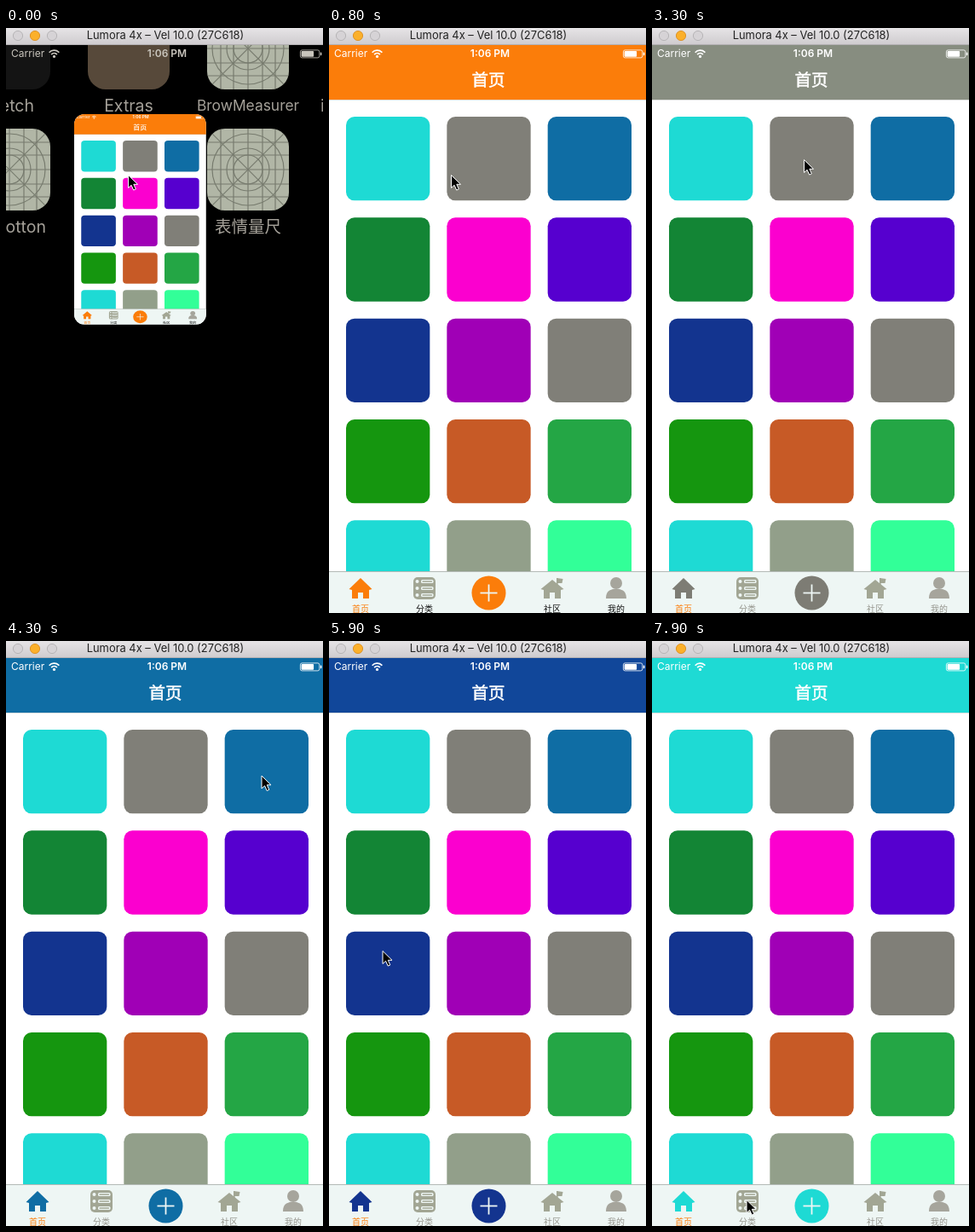
Write an HTML page with a canvas that moves like this. It is 372 px wide and 686 px high and loops after 8000 ms.

```html
<!DOCTYPE html>
<html lang="zh">
<head>
<meta charset="utf-8">
<title>Theme picker</title>
<style>
html, body { margin: 0; width: 100%; height: 100%; overflow: hidden; background: #000; }
canvas { display: block; width: 372px; height: 686px; }
</style>
</head>
<body>
<canvas id="stage"></canvas>
<script>
const W = 372, H = 686, LOOP = 8000, STEP = 100;
const canvas = document.getElementById('stage');
const dpr = window.devicePixelRatio || 1;
canvas.width = W * dpr;
canvas.height = H * dpr;
const c = canvas.getContext('2d');

const LATIN = 'Inter, "Liberation Sans", sans-serif';
const HAN = '"Noto Sans CJK SC", "Noto Sans CJK", sans-serif';
const ORANGE = '#fb7d0a';
const TABS = ['首页', '分类', '', '社区', '我的'];

const CELLS = [
  '#1edad4', '#807f78', '#0f6da4',
  '#138535', '#fb00cf', '#5600cf',
  '#13348f', '#a000b6', '#807f78',
  '#15960f', '#c75a26', '#24a645',
  '#1edad4', '#929f8a', '#32ff98'
];

// start time, header colour, accent colour
const THEMES = [
  [0, ORANGE, ORANGE],
  [1400, '#46d9e1', '#1edad4'],
  [3000, '#878d80', '#7d7c74'],
  [4100, '#0f6da4', '#0f6da4'],
  [4900, '#14913a', '#138535'],
  [5700, '#11479a', '#13348f'],
  [6500, '#15960f', '#15960f'],
  [7300, '#1edad4', '#1edad4']
];

// time, x, y of the pointer tip
const POINTER = [
  [0, 143.5, 172.5], [900, 143.5, 172.5], [1300, 80, 162.5], [2100, 80, 162.5],
  [2800, 178.5, 154.5], [3500, 178.5, 154.5], [4000, 300, 158], [4300, 300, 158],
  [4800, 52.5, 284.5], [5200, 52.5, 284.5], [5600, 63, 363.5], [6000, 63, 363.5],
  [6400, 66, 500], [6700, 66, 500], [7200, 70, 606], [7400, 70, 606],
  [7800, 111, 655.5], [8000, 111, 655.5]
];

function box(x, y, w, h, r, fill) {
  c.beginPath();
  c.roundRect(x, y, w, h, r);
  c.fillStyle = fill;
  c.fill();
}

function disc(x, y, r, fill) {
  c.beginPath();
  c.arc(x, y, r, 0, 7);
  c.fillStyle = fill;
  c.fill();
}

function poly(points, fill) {
  c.beginPath();
  points.forEach(([x, y]) => c.lineTo(x, y));
  c.closePath();
  c.fillStyle = fill;
  c.fill();
}

function text(s, x, y, font, fill, align = 'center') {
  c.font = font;
  c.fillStyle = fill;
  c.textAlign = align;
  c.textBaseline = 'middle';
  c.fillText(s, x, y);
}

function line(x1, y1, x2, y2) {
  c.beginPath();
  c.moveTo(x1, y1);
  c.lineTo(x2, y2);
  c.stroke();
}

function at(x, y, draw) {
  c.save();
  c.translate(x, y);
  draw();
  c.restore();
}

function statusBar(col) {
  text('Carrier', 6, 10.5, '400 12px ' + LATIN, col, 'left');
  c.strokeStyle = col;
  c.lineWidth = 1.7;
  for (const r of [4.6, 8]) {
    c.beginPath();
    c.arc(56.5, 14.2, r, -Math.PI * 0.76, -Math.PI * 0.24);
    c.stroke();
  }
  disc(56.5, 13.4, 1.6, col);
  text('1:06 PM', 189, 10.5, '600 12px ' + LATIN, col);
  c.lineWidth = 0.8;
  c.beginPath();
  c.roundRect(345.4, 5.9, 22.4, 9, 2);
  c.stroke();
  box(346.6, 7.1, 14.5, 6.6, 1, col);
  box(368.8, 8.6, 1.6, 3.6, 1, col);
}

function house(col, top) {
  poly([[-13.5, 1], [0, top], [13.5, 1], [10, 2], [10, 12], [3, 12], [3, 5],
    [-3, 5], [-3, 12], [-10, 12], [-10, 2]], col);
}

function homeIcon(col) {
  house(col, -12);
}

function listIcon(col) {
  box(-13, -13, 26, 26, 5, col);
  for (const y of [-8, 0, 8]) {
    disc(-8.5, y, 2, '#eef6f4');
    box(-4, y - 2, 14.5, 4, 1.5, '#eef6f4');
    box(-2.5, y - 0.8, 11.5, 1.6, 0.5, col);
  }
}

function townIcon(col) {
  house(col, -10);
  box(5, -12, 1.6, 10, 0, col);
  poly([[5, -12], [12.5, -11], [11.5, -6], [5, -6]], col);
}

function userIcon(col) {
  disc(0, -6, 7, col);
  c.beginPath();
  c.moveTo(-12, 12);
  c.bezierCurveTo(-12, 3, -7, 2, -4, 1);
  c.lineTo(4, 1);
  c.bezierCurveTo(7, 2, 12, 3, 12, 12);
  c.closePath();
  c.fill();
}

function tabBar(accent, dark) {
  box(0, 617.5, 375, 49.5, 0, '#eef6f4');
  box(0, 617, 375, 1, 0, '#b4bab6');
  const grey = '#a2a694';
  at(37, 637, () => homeIcon(accent));
  at(112, 637, () => listIcon(grey));
  at(262, 637, () => townIcon(grey));
  at(337, 637, () => userIcon('#a6a59c'));
  disc(187.5, 642.5, 20, accent);
  c.strokeStyle = '#eef6f4';
  c.lineWidth = 1.8;
  line(177.5, 642.5, 197.5, 642.5);
  line(187.5, 632.5, 187.5, 652.5);
  TABS.forEach((s, i) => {
    const col = i === 0 ? ORANGE : dark ? '#111' : '#95958d';
    text(s, 37 + 75 * i, 661, '10px ' + HAN, col);
  });
}

function app(theme) {
  const [start, head, accent] = theme;
  box(0, 0, 375, 667, 0, '#fff');
  const size = 295 / 3;
  CELLS.forEach((col, i) => {
    const x = 20 + (i % 3) * (size + 20);
    const y = 84 + Math.floor(i / 3) * (size + 20);
    box(x, y, size, size, 10, col);
  });
  box(0, 0, 375, 64, 0, head);
  box(0, 64, 375, 0.6, 0, 'rgba(0,0,0,0.25)');
  statusBar('#fff');
  text('首页', 187, 40.6, '500 19.5px ' + HAN, '#fff');
  c.strokeStyle = '#fff';
  c.lineWidth = 0.5;
  c.strokeText('首页', 187, 40.6);
  tabBar(accent, start === 0);
}

function blankIcon(x, y) {
  c.save();
  box(x, y, 96, 96, 21, '#b1b6a6');
  c.clip();
  c.translate(x + 48, y + 48);
  c.strokeStyle = '#777b6e';
  c.lineWidth = 1.2;
  for (const d of [-32, -17, 0, 17, 32]) {
    line(d, -48, d, 48);
    line(-48, d, 48, d);
  }
  line(-48, -48, 48, 48);
  line(-48, 48, 48, -48);
  for (const r of [17, 25, 42]) {
    c.beginPath();
    c.arc(0, 0, r, 0, 7);
    c.stroke();
  }
  c.restore();
}

function homeScreen(p) {
  c.save();
  c.globalAlpha = p;
  const zoom = 1 + (1 - p) * 1.2;
  c.save();
  c.translate(157, 225);
  c.scale(zoom, zoom);
  c.translate(-157, -225);
  box(-44, -24, 96, 96, 21, '#141414');
  box(96, -24, 96, 96, 21, '#57493a');
  blankIcon(236, -24);
  blankIcon(-44, 118);
  blankIcon(236, 118);
  const col = '#a5a199', font = '400 19.5px ' + LATIN;
  text('etch', 33, 92, font, col, 'right');
  text('Extras', 144, 92, font, col);
  text('BrowMeasurer', 284, 92, '400 17.4px ' + LATIN, col);
  text('i', 369, 92, font, col, 'left');
  text('otton', 47, 234, font, col, 'right');
  text('表情量尺', 284, 233, '19.5px ' + HAN, col);
  c.restore();
  at(0, 20, () => statusBar('#c9c5bd'));
  c.restore();
}

function titleBar() {
  const g = c.createLinearGradient(0, 0, 0, 20);
  g.addColorStop(0, '#e6e4e6');
  g.addColorStop(1, '#cecbce');
  box(0, 0, W, 20, 0, g);
  box(0, 19.3, W, 0.7, 0, '#aaa7aa');
  [['#d6d3d6', '#b3b0b3'], ['#fbb02b', '#dc8d1e'], ['#d6d3d6', '#b3b0b3']].forEach(([fill, edge], i) => {
    disc(14 + i * 20, 9, 5.6, fill);
    c.strokeStyle = edge;
    c.lineWidth = 0.9;
    c.stroke();
  });
  text('Lumora 4x – Vel 10.0 (27C618)', 187, 9.5, '400 12.9px ' + LATIN, '#222');
}

function pointer(t) {
  let i = 0;
  while (i < POINTER.length - 2 && POINTER[i + 1][0] <= t) i++;
  const [t0, x0, y0] = POINTER[i], [t1, x1, y1] = POINTER[i + 1];
  const u = (t - t0) / (t1 - t0), e = u * u * (3 - 2 * u);
  at(x0 + (x1 - x0) * e, y0 + (y1 - y0) * e, () => {
    poly([[0, 0], [0, 15], [3.6, 11.8], [6.2, 17.6], [8.8, 16.4], [6.3, 10.8], [11, 10.8]], '#000');
    c.strokeStyle = '#fff';
    c.lineWidth = 1;
    c.lineJoin = 'round';
    c.stroke();
  });
}

function draw(t) {
  c.setTransform(dpr, 0, 0, dpr, 0, 0);
  box(0, 0, W, H, 0, '#000');
  // remaining share of the launch zoom
  const p = t < 300 ? Math.exp(-0.019 * t) : 0;
  if (p > 0.05) homeScreen(p);
  const sx = 1 - 0.587 * p, sy = 1 - 0.63 * p;
  const x = 80 * p, y = 20 + 81 * p;
  c.save();
  c.beginPath();
  c.roundRect(x, y, 375 * sx, 667 * sy, 12 * p);
  c.clip();
  c.translate(x, y);
  c.scale(sx, sy);
  app(THEMES.filter(th => th[0] <= t).pop());
  c.restore();
  titleBar();
  pointer(t);
}

const begin = performance.now();
function tick() {
  const t = (performance.now() - begin) % LOOP;
  draw(Math.floor(t / STEP) * STEP);
  requestAnimationFrame(tick);
}
tick();
</script>
</body>
</html>
```
